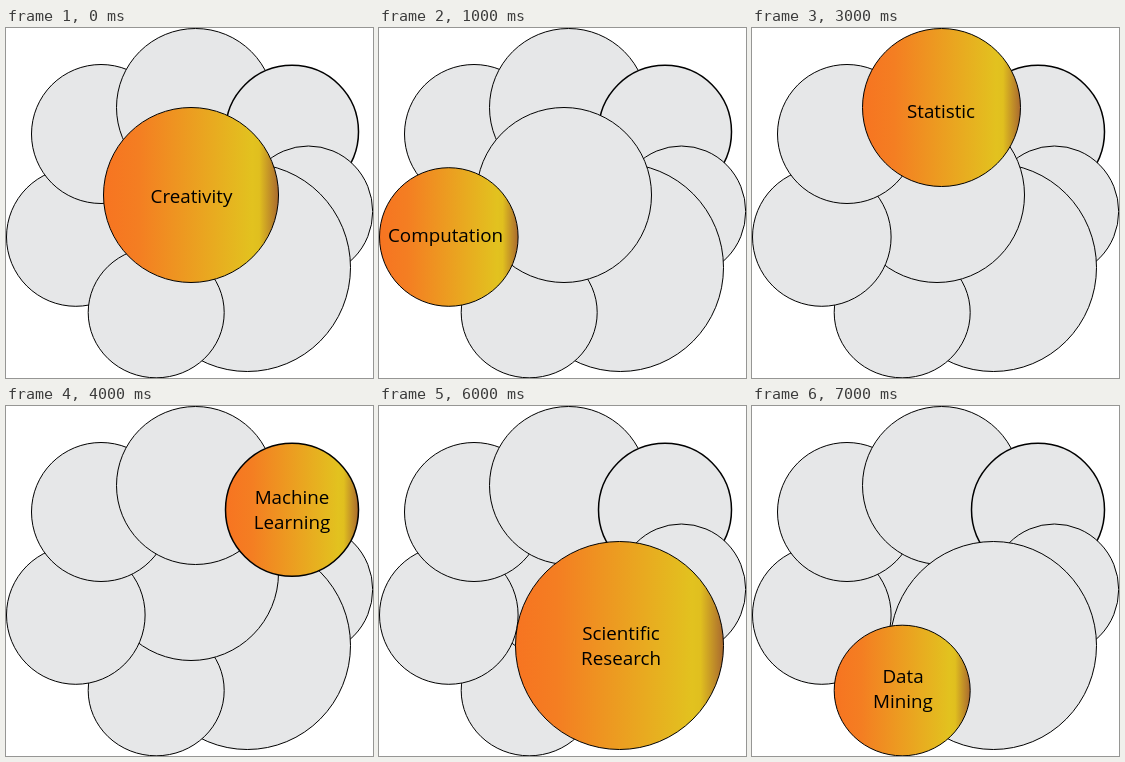
An HTML page that plays this animation: 367x350 px, repeating every 8000 ms.

```html
<!DOCTYPE html>
<html lang="en">
<head>
<meta charset="utf-8">
<title>Circle of skills</title>
<style>
  html, body { margin: 0; width: 100%; height: 100%; overflow: hidden; background: #fff; }
  svg { display: block; width: 367px; height: 350px; }
  ellipse { fill: #e6e7e8; stroke: #000; }
  text { font: 18.8px "Open Sans", "Noto Sans", sans-serif; text-anchor: middle; visibility: hidden; }
  .active ellipse { fill: url(#glow); }
  .active text { visibility: visible; }
</style>
</head>
<body>
<svg id="stage" viewBox="0 0 367 350">
  <defs>
    <linearGradient id="glow">
      <stop offset="0" stop-color="#f77421"/>
      <stop offset="0.2" stop-color="#f47e22"/>
      <stop offset="0.85" stop-color="#e2c21f"/>
      <stop offset="0.89" stop-color="#e0bf1f"/>
      <stop offset="1" stop-color="#a9692f"/>
    </linearGradient>
  </defs>
</svg>
<script>
const STEP = 1000;
const LINE_HEIGHT = 25;
const stage = document.getElementById('stage');

// Listed in the order in which they light up.
const circles = [
  { cx: 185, cy: 167, rx: 87.5, lines: ['Creativity'], tx: 185.5, ty: 175 },
  { cx: 69.8, cy: 209, rx: 69.3, lines: ['Computation'], tx: 66.5, ty: 214 },
  { cx: 95, cy: 106, rx: 69.5, lines: ['Mathematic'], tx: 95, ty: 112 },
  { cx: 189.5, cy: 79.5, rx: 79, lines: ['Statistic'], tx: 189, ty: 90 },
  { cx: 286, cy: 103.7, rx: 66.5, lines: ['Machine', 'Learning'], tx: 286, ty: 98, stroke: 1.5 },
  { cx: 302.4, cy: 183.5, rx: 64.3, ry: 65.5, lines: ['Visualization'], tx: 304.5, ty: 193 },
  { cx: 240.5, cy: 239.5, rx: 104, lines: ['Scientific', 'Research'], tx: 242, ty: 234, rest: { cx: 241.3, rx: 103.2 } },
  { cx: 150.2, cy: 284.5, rx: 68, ry: 65.3, lines: ['Data', 'Mining'], tx: 151, ty: 277 }
];

function add(parent, tag, attrs) {
  const node = document.createElementNS('http://www.w3.org/2000/svg', tag);
  for (const name in attrs) node.setAttribute(name, attrs[name]);
  return parent.appendChild(node);
}

for (const c of circles) {
  c.group = add(stage, 'g');
  c.shape = add(c.group, 'ellipse', {
    cy: c.cy, ry: c.ry || c.rx, 'stroke-width': c.stroke || 1
  });
  c.lines.forEach((line, i) => {
    add(c.group, 'text', { x: c.tx, y: c.ty + i * LINE_HEIGHT }).textContent = line;
  });
}

// The active circle is on top; the one about to follow it lies lowest.
function show(step) {
  const count = circles.length;
  for (let i = 1; i <= count; i++) {
    const c = circles[(step + i) % count];
    const active = i === count;
    const size = active ? c : c.rest || c;
    c.shape.setAttribute('cx', size.cx);
    c.shape.setAttribute('rx', size.rx);
    c.group.classList.toggle('active', active);
    stage.appendChild(c.group);
  }
}

const start = performance.now();
let current = -1;

function tick() {
  const elapsed = performance.now() - start;
  const step = Math.floor(elapsed / STEP) % circles.length;
  if (step !== current) show(current = step);
  requestAnimationFrame(tick);
}
tick();
</script>
</body>
</html>
```
